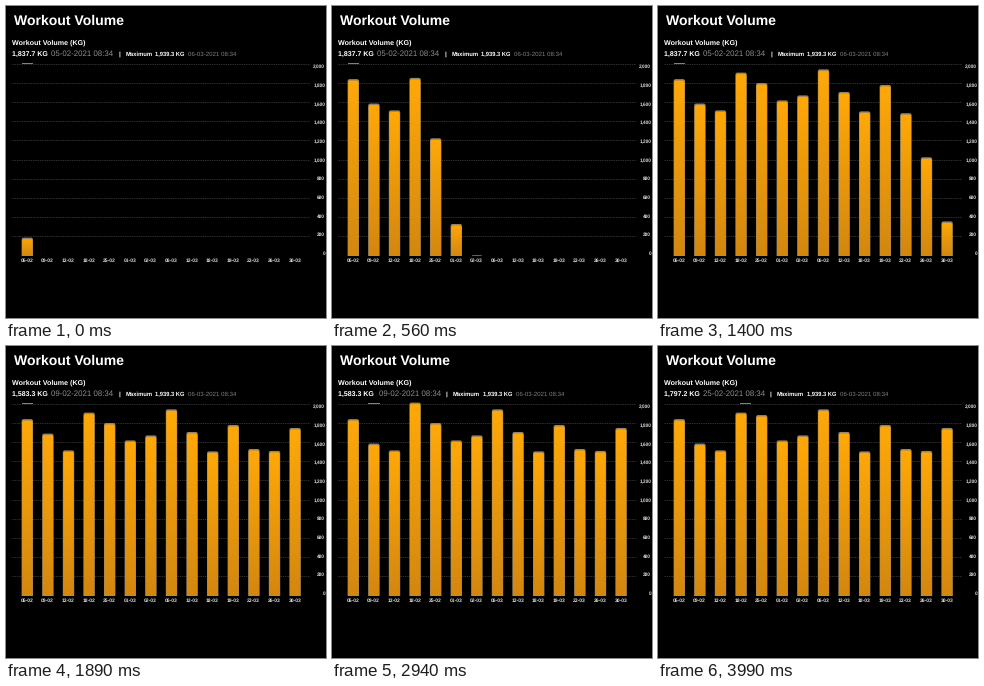
Recreate the animation shown at these times as a matplotlib script. Size 320 by 312 pixels, loop 4060 ms.

```python
import numpy as np
import matplotlib.pyplot as plt
from matplotlib.animation import FuncAnimation
from matplotlib.patches import FancyBboxPatch, Rectangle

plt.rcParams["font.family"] = "Liberation Sans"
plt.rcParams["text.hinting"] = "none"

W, H, DPI = 320, 312, 100
STEP, FRAMES = 70, 58
TOP, BASE = 57.5, 249.8
SCALE = (BASE - TOP) / 2000
BAR_W, X0, PITCH = 11.4, 21.3, 20.6
EASE, STAGGER, LEAD = 375, 105, 85
LIFT = 10

DATES = ("05-02 09-02 13-02 18-02 25-02 01-03 02-03 "
         "06-03 12-03 18-03 19-03 23-03 26-03 30-03").split()
VALUES = [1837.7, 1583.3, 1512.5, 1905.4, 1797.2, 1616, 1668,
          1939.3, 1704, 1502, 1777, 1527, 1507, 1746]
# (time of release, bar)
TAPS = [(1870, 1), (2960, 3), (3870, 4)]
DATE_X = {0: 45, 1: 46.8, 3: 46.4, 4: 44.8}

fig = plt.figure(figsize=(W / DPI, H / DPI), dpi=DPI, facecolor="black")
ax = fig.add_axes([0, 0, 1, 1])
ax.axis("off")


def ease(t):
    """Quadratic ease in and out."""
    x = min(max(t / EASE, 0), 1)
    return 2 * x * x if x < 0.5 else 1 - 2 * (1 - x) ** 2


def label(x, y, text, px, color="white", weight="normal", ha="left"):
    return ax.text(x, y, text, fontsize=px * 72 / DPI, color=color,
                   weight=weight, ha=ha, va="baseline", zorder=5)


def centre(i):
    return X0 + PITCH * i


def make_box(color):
    box = FancyBboxPatch((0, 0), 1, 1, lw=0, fc=color, zorder=2,
                         boxstyle="round,pad=0,rounding_size=2")
    ax.add_patch(box)
    return box


class Bar:
    shade = np.linspace((1, 0.66, 0.03), (0.83, 0.53, 0.06), 64)[:, None, :]

    def __init__(self, i):
        self.x = centre(i) - BAR_W / 2
        self.rim = make_box("#94866c")
        self.face = make_box("none")
        self.fill = ax.imshow(self.shade, aspect="auto", zorder=2.2,
                              interpolation="bilinear")
        self.fill.set_clip_path(self.face)

    def set_height(self, h):
        top = BASE - h
        shown = h > 0.3
        self.rim.set_visible(shown)
        self.fill.set_visible(h > 2)
        if not shown:
            return
        self.rim.set_bounds(self.x, top, BAR_W, h + 4)
        self.face.set_bounds(self.x + 0.5, top + 1.5, BAR_W - 1, h + 4)
        self.fill.set_extent((self.x, self.x + BAR_W, BASE, top))


# axes and grid
for k in range(11):
    y = TOP + k * 19.2
    ax.plot([6, 303], [y, y], color="#3e3e3e", lw=0.55,
            dashes=(1.8, 1.2), zorder=1)
    label(319.2, 62.5 + 18.65 * k, f"{2000 - 200 * k:,}", 4.7, "#d8d8d8",
          weight="bold", ha="right")

bars = [Bar(i) for i in range(len(VALUES))]
ax.add_patch(Rectangle((0, BASE + 0.3), W, 10, fc="black", lw=0, zorder=3))
for i, day in enumerate(DATES):
    label(centre(i) - 0.3, 256.1, day, 5, "#d8d8d8", weight="bold",
          ha="center")

marker = Rectangle((0, 56.5), BAR_W, 1.6, lw=0, fc="#a8745c", zorder=4)
ax.add_patch(marker)

# headings
label(8, 18.8, "Workout Volume", 14, weight="bold")
label(6, 39, "Workout Volume (KG)", 7.12, weight="bold")
value = label(6, 50.4, "", 6.95, weight="bold")
date = label(45, 50.4, "", 7.85, "#8e8e8e")
peak = [
    (67.2, label(0, 50, "|", 6.5, weight="bold")),
    (74.2, label(0, 50, "Maximum", 5.85, weight="bold")),
    (104.4, label(0, 50, "1,939.3 KG", 5.77, weight="bold")),
    (137.2, label(0, 50, "06-03-2021 08:34", 6.2, "#808080")),
]
value_clip = Rectangle((0, 40), 100, 14, fc="none", lw=0)
ax.add_patch(value_clip)
value.set_clip_path(value_clip)

ax.set_xlim(0, W)
ax.set_ylim(H, 0)


def selection(t):
    """Current bar, previous bar and time since the change."""
    now, before, age = 0, 0, 1e4
    for start, i in TAPS:
        if t >= start:
            now, before, age = i, now, t - start
    return now, before, age


def draw(n):
    t = n * STEP
    lift = [0] * len(bars)
    for start, i in TAPS:
        lift[i] += LIFT * (ease(t - start + 480) - ease(t - start))
    for i, bar in enumerate(bars):
        grown = ease(t - STAGGER * i + LEAD)
        bar.set_height(VALUES[i] * SCALE * grown + lift[i])

    now, before, age = selection(t)
    x = centre(before) + (centre(now) - centre(before)) * ease(age)
    marker.set_x(x - BAR_W / 2)

    value.set_text(f"{VALUES[now]:,.1f} KG")
    date.set_text(f"{DATES[now]}-2021 08:34")
    settling = age < STEP
    left = DATE_X[before if settling else now]
    value_clip.set_width(left - 3 if settling else 100)
    date.set_x(left)
    for dx, item in peak:
        item.set_x(left + dx)
    return []


anim = FuncAnimation(fig, draw, frames=FRAMES, interval=STEP,
                     init_func=lambda: draw(0), repeat=True, repeat_delay=0)
plt.show()
```
